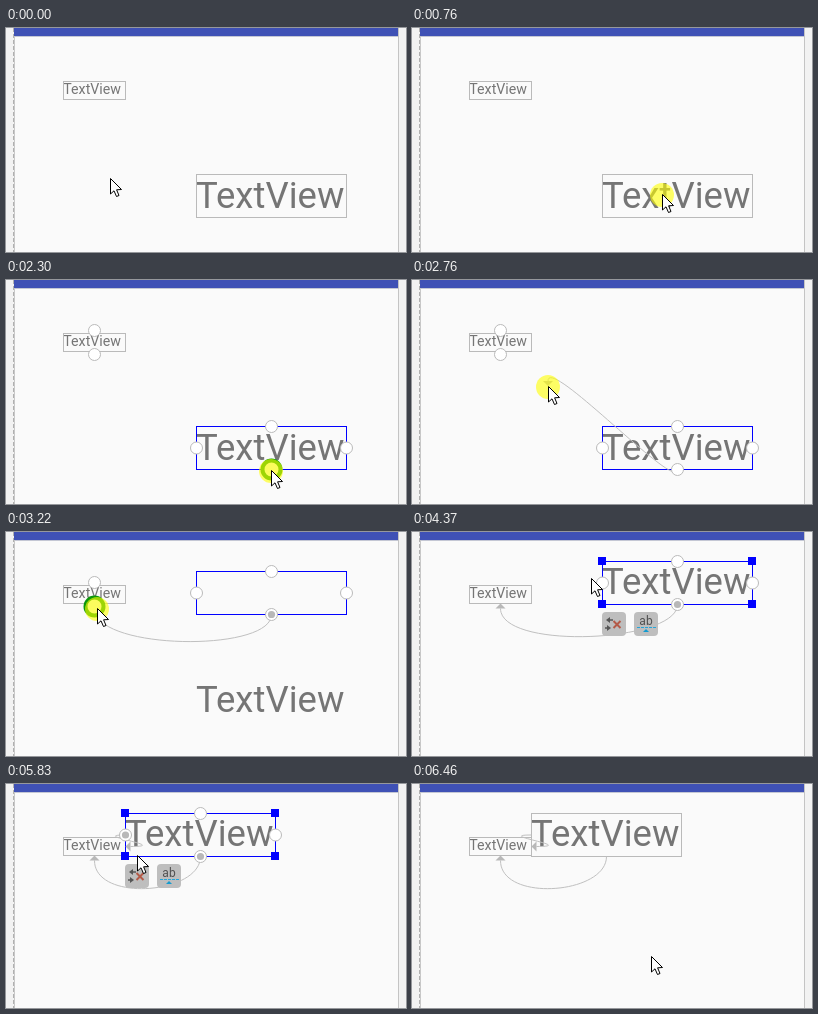
These frames come from a looping animation (400x224 px, 7560 ms). An HTML page with a canvas:

```html
<!DOCTYPE html>
<html lang="en">
<head>
<meta charset="utf-8">
<title>Connecting constraints</title>
<style>
  html, body { margin: 0; width: 100%; height: 100%; overflow: hidden; background: #f2f2f2; }
  canvas { display: block; width: 100vw; height: 100vh; }
</style>
</head>
<body>
<canvas id="stage" width="400" height="224"></canvas>
<script>
const ctx = document.getElementById('stage').getContext('2d');
const LOOP = 7560, TICK = 76.8;
const GRAY = '#bababa', BLUE = '#00f';
const SMALL = { x: 57, y: 53, w: 62, h: 18 };

// Pointer path: tick, x, y
const pointerPath = [
  [3, 104, 150], [9, 250, 166], [12, 250, 166], [15, 282, 194], [16, 282, 194],
  [18, 275, 190], [20, 275, 190], [24, 267, 194], [25, 267, 194], [28, 265, 190],
  [30, 265, 190], [39, 91, 76], [51, 91, 76], [57, 179, 46], [61, 190, 50],
  [63, 190, 50], [68, 129, 58], [71, 122, 63], [75, 122, 63], [81, 239, 172]
];

const clamp = v => Math.max(0, Math.min(1, v));
const smooth = v => v * v * (3 - 2 * v);
const settle = (tick, start) => 1 - (1 - clamp((tick - start) / 4.24)) ** 2;
const during = (tick, ...spans) => spans.some(([a, b]) => tick >= a && tick < b);

function pointerAt(tick) {
  const next = pointerPath.findIndex(key => key[0] > tick);
  if (next < 0) return pointerPath.at(-1).slice(1);
  if (next === 0) return pointerPath[0].slice(1);
  const [t0, x0, y0] = pointerPath[next - 1], [t1, x1, y1] = pointerPath[next];
  const k = smooth((tick - t0) / (t1 - t0));
  return [Math.round(x0 + (x1 - x0) * k), Math.round(y0 + (y1 - y0) * k)];
}

function rect(x, y, w, h, color) {
  ctx.fillStyle = color;
  ctx.fillRect(x, y, w, h);
}

function polygon(color, ...points) {
  ctx.beginPath();
  points.forEach(p => ctx.lineTo(...p));
  ctx.closePath();
  ctx.fillStyle = color;
  ctx.fill();
}

function line(x0, y0, x1, y1, color, width = 1, dash = []) {
  ctx.beginPath();
  ctx.moveTo(x0, y0);
  ctx.lineTo(x1, y1);
  ctx.strokeStyle = color;
  ctx.lineWidth = width;
  ctx.setLineDash(dash);
  ctx.stroke();
  ctx.setLineDash([]);
}

function circle([x, y], r, fill, stroke, width = 1) {
  ctx.beginPath();
  ctx.arc(x, y, r, 0, Math.PI * 2);
  if (fill) { ctx.fillStyle = fill; ctx.fill(); }
  if (stroke) { ctx.strokeStyle = stroke; ctx.lineWidth = width; ctx.stroke(); }
}

function label(x, baseline, size) {
  ctx.font = `${size}px Roboto, sans-serif`;
  ctx.textAlign = 'left';
  ctx.fillStyle = '#757575';
  ctx.fillText('TextView', x, baseline);
}

function outline({ x, y, w, h }, color) {
  ctx.strokeStyle = color;
  ctx.lineWidth = 1;
  ctx.strokeRect(x + .5, y + .5, w, h);
}

function anchors({ x, y, w, h }, gap = 0) {
  const cx = x + w / 2 + .5, cy = y + h / 2 + .5;
  return {
    top: [cx, y + .5 - gap], bottom: [cx, y + h + .5 + gap],
    left: [x + .5, cy], right: [x + w + .5, cy]
  };
}

function handle(point, connected) {
  circle(point, 6, '#fff', GRAY);
  if (connected) circle(point, 3.6, '#b8b8b8');
}

function ring(point) {
  circle(point, 9, '#f4f8e8', '#0b960b', 4);
}

// Curve leaving along `out`, arriving at an arrowhead whose base faces `back`.
function connection([x0, y0], out, [x1, y1], back, reach = 40) {
  const bx = x1 + back[0] * 5, by = y1 + back[1] * 5;
  const reachOut = reach * .95, reachBack = reach * 1.05;
  ctx.beginPath();
  ctx.moveTo(x0, y0);
  ctx.bezierCurveTo(x0 + out[0] * reachOut, y0 + out[1] * reachOut,
    bx + back[0] * reachBack, by + back[1] * reachBack, bx, by);
  ctx.strokeStyle = '#c0c0c0';
  ctx.lineWidth = 1;
  ctx.stroke();
  const sx = back[1] * 5, sy = back[0] * 5;
  polygon('#b8b8b8', [x1, y1], [bx + sx, by + sy], [bx - sx, by - sy]);
}

function page(highlight) {
  rect(0, 0, 400, 224, '#f2f2f2');
  rect(8, 0, 384, 224, '#fafafa');
  rect(8, 0, 384, 8, '#3f51b5');
  line(8, 8.5, 393, 8.5, highlight ? '#4a9de0' : '#c4c7d4');
  line(392.5, 0, 392.5, 224, '#c4c4c4');
  line(8.5, 8, 8.5, 224, '#c8c8c8');
  line(7.5, 0, 7.5, 224, highlight ? '#3f9ce6' : '#b0b0b0', 1, [4, 2]);
  if (highlight) line(392.5, 9, 392.5, 224, '#5aaeea', 1, [3, 2]);
}

function button(x, y) {
  ctx.beginPath();
  ctx.roundRect(x, y, 24, 24, 4);
  ctx.fillStyle = '#bebebe';
  ctx.fill();
}

function toolbar(x, y, crossColor) {
  button(x, y);
  polygon('#555', [x + 4, y + 8], [x + 8, y + 5], [x + 8, y + 11]);
  line(x + 8, y + 8, x + 11, y + 8, '#555', 1.5);
  polygon('#555', [x + 9, y + 16], [x + 5, y + 13], [x + 5, y + 19]);
  line(x + 3, y + 16, x + 5, y + 16, '#555', 1.5);
  line(x + 11.5, y + 9, x + 18.5, y + 16, crossColor, 2);
  line(x + 18.5, y + 9, x + 11.5, y + 16, crossColor, 2);

  button(x + 32, y);
  ctx.font = '12px Roboto, sans-serif';
  ctx.textAlign = 'center';
  ctx.fillStyle = '#505050';
  ctx.fillText('ab', x + 44, y + 13);
  line(x + 35, y + 15.5, x + 54, y + 15.5, '#25a5da', 1, [3, 1]);
  polygon('#139bd0', [x + 44, y + 17], [x + 47, y + 20], [x + 41, y + 20]);
}

function pointer(x, y) {
  const shape = [[.5, .5], [.5, 16], [4, 12.8], [6.5, 18.5], [9, 17.5], [6.6, 11.8], [11.5, 11.5]];
  polygon('#fff', ...shape.map(([dx, dy]) => [x + dx, y + dy]));
  ctx.strokeStyle = '#000';
  ctx.lineWidth = 1;
  ctx.stroke();
}

function draw(tick) {
  const at = (...spans) => during(tick, ...spans);
  const cursor = pointerAt(tick);
  const big = {
    x: 190 - 71 * settle(tick, 69.4), y: 146 - 117 * settle(tick, 39), w: 150, h: 43
  };
  const bigPoints = anchors(big), smallPoints = anchors(SMALL);
  const smallHandles = anchors(SMALL, 3);
  const bottomLinked = tick >= 39, leftLinked = tick >= 69;

  page(at([13, 21], [78, 81]));
  label(57.3, 66, 14.2);
  label(tick < 76 ? 190 : 119, tick < 48 ? 180 : 62, 36.5);
  outline(SMALL, GRAY);
  outline(big, at([11, 83]) ? BLUE : GRAY);

  if (bottomLinked) connection(bigPoints.bottom, [0, 1], smallPoints.bottom, [0, 1]);
  else if (at([31, 39])) connection(bigPoints.bottom, [0, 1], cursor, [0, -1], 25);
  if (leftLinked) connection(bigPoints.left, [-1, 0], smallPoints.right, [1, 0]);
  else if (at([64, 69])) connection(bigPoints.left, [-1, 0], cursor, [1, 0], 25);

  if (at([11, 30], [48, 62], [76, 83])) {
    for (const dx of [0, big.w])
      for (const dy of [0, big.h]) rect(big.x + dx - 4, big.y + dy - 4, 8, 8, BLUE);
    toolbar(big.x, big.y + 51, tick < 30 ? '#d9503f' : '#b45a48');
  }
  if (at([11, 83])) {
    handle(bigPoints.top);
    handle(bigPoints.right);
    handle(bigPoints.bottom, bottomLinked);
    handle(bigPoints.left, leftLinked);
  }
  if (at([26, 48])) { handle(smallHandles.top); handle(smallHandles.bottom); }
  if (at([62, 76])) { handle(smallHandles.left); handle(smallHandles.right); }

  if (at([24, 31])) ring(bigPoints.bottom);
  if (at([39, 48])) ring(smallHandles.bottom);
  if (at([61, 64])) ring(bigPoints.left);
  if (at([69, 76])) ring(smallHandles.right);

  if (at([10, 13], [26, 48], [62, 76], [81, 84]))
    circle([cursor[0], cursor[1] + 1], 12, 'rgba(255, 255, 0, .6)');
  pointer(...cursor);
}

const start = performance.now();
function frame() {
  const time = (performance.now() - start) % LOOP;
  draw(Math.floor((time + 10) / TICK));
  requestAnimationFrame(frame);
}
frame();
</script>
</body>
</html>
```
